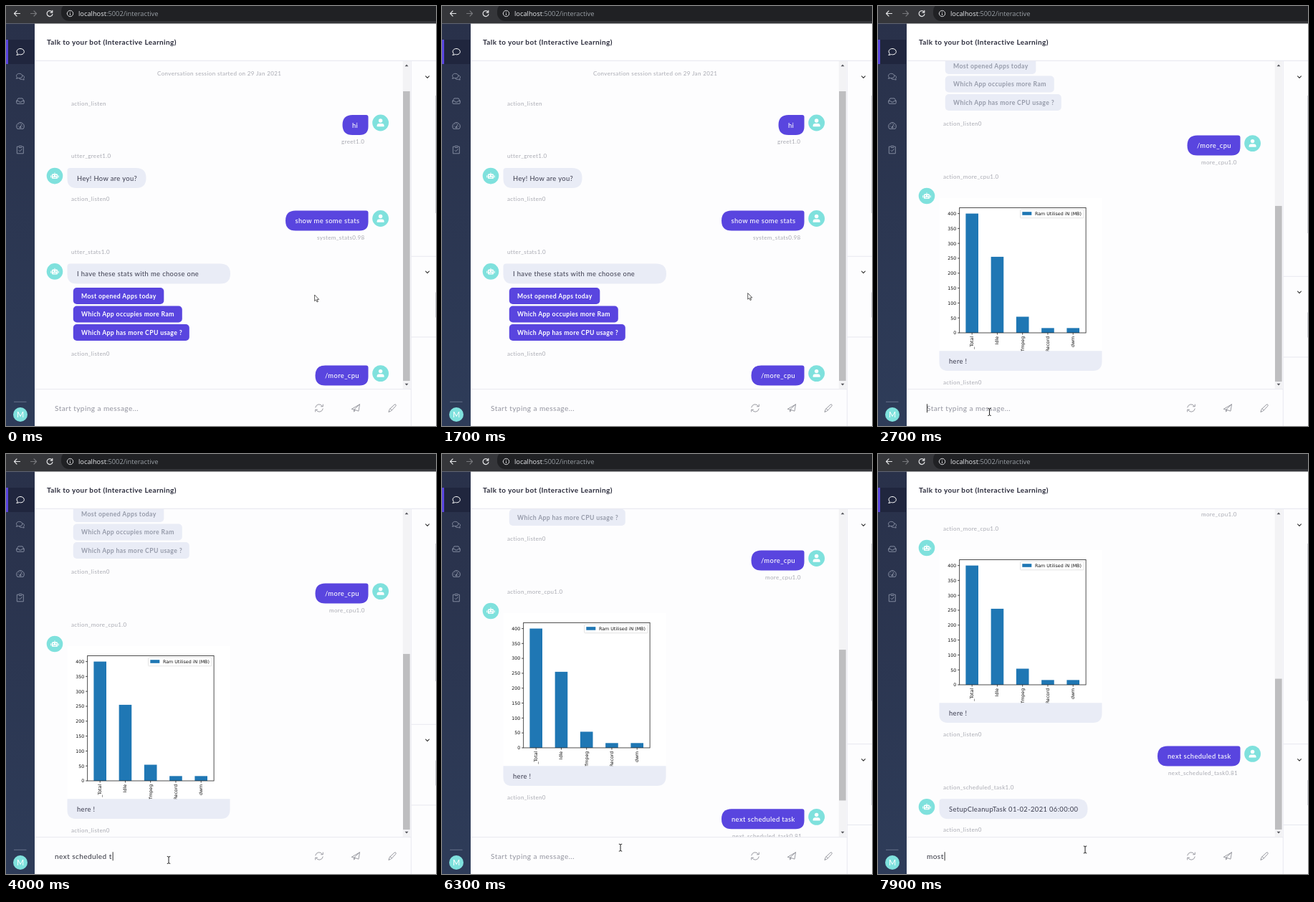
These frames come from a looping animation (600 px wide and 586 px high, 8 s). An HTML page:

```html
<!DOCTYPE html>
<html lang="en">
<head>
<meta charset="utf-8">
<title>Bot chat</title>
<style>
html, body { margin: 0; width: 100%; height: 100%; overflow: hidden; background: #fdfdfe; }
svg { display: block; }
text { font-family: Lato, sans-serif; white-space: pre; }
.url { font: 9.3px "Open Sans", sans-serif; fill: #e8eaed; }
.title { font-size: 10px; font-weight: 700; letter-spacing: .39px; fill: #2b2c3c; }
.label { font-size: 8px; letter-spacing: .37px; fill: #a9aab2; }
.msg { font-size: 9.4px; letter-spacing: .37px; fill: #3b3c4e; }
.mine { fill: #fff; font-weight: 500; }
.btn { font-size: 8.7px; font-weight: 700; letter-spacing: .35px; }
.input { font-size: 10.1px; letter-spacing: .41px; }
.plot { font: 6.3px "DejaVu Sans", sans-serif; fill: #111; }
.icon { fill: none; stroke-linecap: round; stroke-linejoin: round; }
</style>
</head>
<body>
<svg id="stage" width="600" height="586" viewBox="0 0 600 586"></svg>
<script>
const LOOP = 8000;
const PURPLE = '#5945df', TEAL = '#7fe1dd', PALE = '#e9ecf6', LINE = '#e5e6ee';
const stage = document.getElementById('stage');

function el(parent, tag, attrs = {}, text) {
  const node = document.createElementNS('http://www.w3.org/2000/svg', tag);
  for (const k in attrs) node.setAttribute(k, attrs[k]);
  if (text !== undefined) node.textContent = text;
  parent.appendChild(node);
  return node;
}
const group = (p, attrs) => el(p, 'g', attrs);
const rect = (p, x, y, width, height, fill, rx = 0) => el(p, 'rect', { x, y, width, height, fill, rx });
const disc = (p, cx, cy, r, fill) => el(p, 'circle', { cx, cy, r, fill });
const path = (p, d, attrs) => el(p, 'path', { d, ...attrs });
const text = (p, x, y, cls, s) => el(p, 'text', { x, y, class: cls }, s);
const icon = (p, x, y, d, stroke, width = .9) =>
  path(p, d, { class: 'icon', stroke, 'stroke-width': width, transform: `translate(${x} ${y})` });
const move = (node, x, y) => node.setAttribute('transform', `translate(${x} ${y})`);
const show = (node, on) => node.setAttribute('visibility', on ? 'visible' : 'hidden');

// Rounded box with corner radii: top left, top right, bottom right, bottom left
function box(p, x, y, w, h, fill, [a, b, c, d]) {
  path(p, `M${x + a} ${y}h${w - a - b}q${b} 0 ${b} ${b}v${h - b - c}q0 ${c} ${-c} ${c}` +
    `h${c + d - w}q${-d} 0 ${-d} ${-d}v${a + d - h}q0 ${-a} ${a} ${-a}z`, { fill });
}

// Chat parts
const label = (p, x, y, s) => text(p, x, y + 2.4, 'label', s);

function userMessage(p, x, y, tx, s) {
  box(p, x, y - 14, 505.5 - x, 28, PURPLE, [14, 3, 12, 14]);
  text(p, tx, y + 3.6, 'msg mine', s);
  disc(p, 522.6, y - 3, 11.4, TEAL);
  disc(p, 522.6, y - 6, 2.7, '#fff');
  path(p, `M517.6 ${y + 2.2}v-1.2q0-3 3-3h4q3 0 3 3v1.2z`, { fill: '#fff' });
}

function botAvatar(p, y) {
  disc(p, 68, y, 11.3, TEAL);
  rect(p, 63.9, y - 2.8, 8.2, 6.8, '#fff', 1.5);
  rect(p, 62.2, y - .8, 1.1, 3.2, '#fff', .4);
  rect(p, 72.7, y - .8, 1.1, 3.2, '#fff', .4);
  rect(p, 67.5, y - 4.6, 1, 2, '#fff');
  disc(p, 66.2, y - .3, .95, TEAL);
  disc(p, 69.8, y - .3, .95, TEAL);
  rect(p, 65.6, y + 2, 4.8, .8, TEAL);
}

function botMessage(p, y, w, s) {
  botAvatar(p, y - 3.2);
  box(p, 85.5, y - 14.2, w, 28, PALE, [4, 14, 14, 13]);
  text(p, 99, y + 3.5, 'msg', s);
}

function chart(p) {
  const base = 456, unit = 20.8 / 50;
  const bars = [['_Total', 400], ['Idle', 255], ['ffmpeg', 54], ['Record', 16], ['dwm', 16]];
  const ink = { fill: 'none', stroke: '#222', 'stroke-width': .8 };
  rect(p, 85.5, 268, 227, 214, '#fff');
  bars.forEach(([name, v], i) => {
    const x = 131.2 + i * 35.25;
    rect(p, x - 8.8, base - v * unit, 17.6, v * unit, '#1f77b4');
    path(p, `M${x} ${base}v2.6`, ink);
    el(p, 'text', { class: 'plot', 'text-anchor': 'end',
      transform: `translate(${x + 2} 460.8) rotate(-90)` }, name);
  });
  for (let v = 0; v <= 400; v += 50) {
    const y = base - v * unit;
    path(p, `M113.7 ${y}h-2.6`, ink);
    el(p, 'text', { x: 109.3, y: y + 2.3, class: 'plot', 'text-anchor': 'end' }, v);
  }
  el(p, 'rect', { x: 113.7, y: 281.4, width: 176.4, height: 174.6, ...ink });
  el(p, 'rect', { x: 198.5, y: 284, width: 88.5, height: 11.8, rx: 1.2,
    fill: '#fff', stroke: '#d0d0d0', 'stroke-width': .6 });
  rect(p, 201.3, 287.2, 13, 4.6, '#1f77b4');
  text(p, 219, 291.9, 'plot', 'Ram Utilised iN (MB)');
}

const defs = el(stage, 'defs');
const clip = el(defs, 'clipPath', { id: 'view' });
rect(clip, 40, 77, 525, 457.5, '#000');
const fade = el(defs, 'linearGradient', { id: 'side', x2: 0, y2: 1 });
el(fade, 'stop', { offset: 0, 'stop-color': '#29314a' });
el(fade, 'stop', { offset: 1, 'stop-color': '#2e3c59' });

rect(stage, 0, 0, 600, 586, '#fdfdfe');

// Conversation
const view = group(stage, { 'clip-path': 'url(#view)' });
const chat = group(view);
text(chat, 211, 96.6, 'label', 'Conversation session started on 29 Jan 2021');
label(chat, 91, 136.5, 'action_listen');
userMessage(chat, 469.5, 166, 483, 'hi');
label(chat, 468, 190, 'greet1.0');
label(chat, 91, 210, 'utter_greet1.0');
botMessage(chat, 240.3, 110, 'Hey! How are you?');
label(chat, 91, 270, 'action_listen0');
userMessage(chat, 390, 299.5, 403.5, 'show me some stats');
label(chat, 434, 323.8, 'system_stats0.98');
label(chat, 91, 344, 'utter_stats1.0');
botMessage(chat, 373.6, 227.5, 'I have these stats with me choose one');
const buttons = [['Most opened Apps today', 126.5], ['Which App occupies more Ram', 152],
  ['Which App has more CPU usage ?', 162]].map(([s, w], i) => {
  const y = 393 + i * 25.5;
  return [rect(chat, 93.8, y, w, 23, PURPLE, 5), text(chat, 105, y + 14.7, 'btn', s)];
});
label(chat, 91, 485.5, 'action_listen0');
userMessage(chat, 431.5, 515.6, 445, '/more_cpu');

const stats = group(chat);
label(stats, 451, 539.3, 'more_cpu1.0');
label(stats, 91, 559.5, 'action_more_cpu1.0');
botAvatar(stats, 586);
chart(group(stats, { transform: 'translate(0 321)' }));
box(stats, 85.5, 802.3, 227, 27.8, PALE, [0, 0, 13, 12]);
text(stats, 99, 820.3, 'msg', 'here !');
label(stats, 91, 846.3, 'action_listen0');

const asked = group(chat);
userMessage(asked, 390, 876.4, 404, 'next scheduled task');

const answer = group(chat);
label(answer, 405, 901, 'next_scheduled_task0.81');
label(answer, 91, 920.5, 'action_scheduled_task1.0');
botMessage(answer, 950.5, 207, 'SetupCleanupTask 01-02-2021 06:00:00');
label(answer, 91, 980, 'action_listen0');

// Scrollbar
rect(stage, 553.8, 77, 10.4, 457, '#f3f3f5');
const thumb = rect(stage, 554, 88, 9.6, 400, '#bebec0');
path(stage, 'M556.6 84.2h4.8l-2.4-2.8zM556.6 526.8h4.8l-2.4 2.8z', { fill: '#55565c' });

// Story panel
rect(stage, 564.8, 77, .9, 509, LINE);
const chevron = 'M-2.4-1.2 0 1.3 2.4-1.2';
icon(stage, 588, 99, chevron, '#333', 1.1);
const edge = rect(stage, 599, 125, 1, 164, '#d3d4db');
const panel = group(stage);
rect(panel, 565.5, 348.8, 35, .9, LINE);
icon(panel, 588, 371.4, chevron, '#333', 1.1);
rect(panel, 599, 399.5, 1, 35, '#d3d4db');
rect(panel, 565.5, 461.5, 35, .9, LINE);

// Header and browser bar
rect(stage, 40, 24, 560, 52, '#fff');
rect(stage, 40, 75.8, 560, 1, LINE);
text(stage, 57, 53.6, 'title', 'Talk to your bot (Interactive Learning)');
rect(stage, 0, 0, 600, 24.5, '#35363a');
rect(stage, 77, -4, 540, 25, '#202124', 11);
icon(stage, 15.5, 10.5, 'M4 0H-4M-.5-3.6-4 0-.5 3.6', '#e3e4e6', 1.2);
icon(stage, 38.5, 10.5, 'M-4 0H4M.5-3.6 4 0 .5 3.6', '#77787c', 1.2);
icon(stage, 61, 10.5, 'M3.2-2.2A3.9 3.9 0 1 0 3.9.8M3.8-4.2V-1.4H1', '#e3e4e6', 1.2);
icon(stage, 89.5, 10.5, 'M-4.2 0a4.2 4.2 0 1 0 8.4 0a4.2 4.2 0 1 0-8.4 0M0 0V2M0-2v.1', '#d5d6d9', 1);
const url = text(stage, 101, 14, 'url', 'localhost');
el(url, 'tspan', { fill: '#9aa0a6' }, ':5002/interactive');

// Sidebar
rect(stage, 0, 24.5, 40, 562, 'url(#side)');
rect(stage, 0, 47, 39, 34, '#20263e');
rect(stage, 0, 47, 3, 34, PURPLE);
const bubble = 'M-4.8 4.3Q-3.6 3-3.8 2.2C-6.6-.8-4-4.5 0-4.5C3.2-4.5 5.3-2.5 5.3-.3C5.3 3 1.5 4.5-1.6 3.5Q-3 4.4-4.8 4.3z';
icon(stage, 20, 64, bubble, '#fff', 1);
const dim = '#8d95a9';
icon(stage, 20, 98.5, 'M-5.3 2.5Q-4.4 1.6-4.6 1C-6.8-1.4-4.6-4.2-1.6-4.2C1.2-4.2 2.8-2.5 2.8-.9C2.8 1.6-.2 2.7-2.6 2Q-4 2.7-5.3 2.5zM3-1.8C6-1 6 1.5 4.6 2.8Q4.6 3.8 5.4 4.4Q3.6 4.6 2.6 3.8C1 4.3-.8 3.8-1.6 2.6', dim);
icon(stage, 20, 132.5, 'M-5.2 0-3-3.6H3L5.2 0V2.8Q5.2 3.8 4.2 3.8H-4.2Q-5.2 3.8-5.2 2.8zH-2.3L-1.4 1.5H1.4L2.3 0H5.2', dim);
icon(stage, 20, 167, 'M-4.4 4A5.3 5.3 0 1 1 4.4 4zM0 2 2-2M-1 2.2A1 1 0 1 0 1 2.2A1 1 0 1 0-1 2.2M-3.3.8h.1M-2.2-2h.1M3.3.8h.1M0-3h.1', dim);
icon(stage, 20, 200.5, 'M-4.3-4.3H-1.8V-5.2H1.8V-4.3H4.3V5.3H-4.3zM-2 1-.6 2.4 2.2-.8M-1.6-3H1.6', dim);
rect(stage, 11, 551.8, 17.5, 1, '#64708a');
disc(stage, 20, 570, 10, TEAL);
el(stage, 'text', { x: 20, y: 574, 'text-anchor': 'middle', fill: '#fff', 'font-size': 11 }, 'M');

// Message input
rect(stage, 40, 534.3, 525, .9, LINE);
const typed = text(stage, 68, 564.8, 'input', '');
const caret = rect(stage, 68, 555.3, .9, 12, '#222');
const grey = '#8f9098';
icon(stage, 437, 561, 'M-5.2-1A5.2 5.2 0 0 1 4.4-2.6M5.3-5V-2.2H2.5M5.2 1A5.2 5.2 0 0 1-4.4 2.6M-5.3 5V2.2H-2.5', grey);
icon(stage, 488, 561, 'M-5.5 1.2 5.5-5.2 4 4.2-.6 2.6zM5.5-5.2-2.4 2.1V5.2L-.6 2.6', grey);
icon(stage, 539, 561, 'M-4.8 5.2Q-4.6 2-2.8.6L3-4.8Q4.2-5.6 5-4.6Q5.6-3.8 4.8-2.8L-.6 3Q-2 4.8-4.8 5.2zM-2.8.6-.6 3', grey);

// Pointers
const arrow = path(stage, 'M0 0V8.6L2 6.9 3.4 10 4.8 9.4 3.5 6.4H6.1z',
  { fill: '#fff', stroke: '#333', 'stroke-width': .8 });
const beam = icon(stage, 0, 0, 'M-1.8-5Q0-5 0-4V4Q0 5-1.8 5M1.8-5Q0-5 0-4M0 4Q0 5 1.8 5', '#222', 1);

const ARRIVE = 1885, SEND = 4450, REPLY = 6200;
const MOUSE = [[0, 430.6, 403], [1650, 430.6, 403], [2000, 362.8, 361.2], [2550, 155.5, 566.5],
  [3000, 155.5, 566.5], [3500, 227, 566.5], [6200, 227, 566.5], [6600, 365.5, 457.8],
  [7200, 365.5, 457.8], [7700, 289, 552], [LOOP, 289, 552]];
const clamp = v => Math.max(0, Math.min(1, v));
const ease = p => p < .5 ? 4 * p ** 3 : 1 - 4 * (1 - p) ** 3;
const glide = (t, start, span) => ease(clamp((t - start) / span));

function mouseAt(t) {
  const i = MOUSE.findIndex(k => k[0] > t);
  const [t0, x0, y0] = MOUSE[i - 1], [t1, x1, y1] = MOUSE[i];
  const p = (t - t0) / (t1 - t0), s = p * p * (3 - 2 * p);
  return [x0 + (x1 - x0) * s, y0 + (y1 - y0) * s];
}

function draft(t) {
  if (t < SEND) return 'next scheduled task'.slice(0, Math.max(0, Math.ceil((t - 2780) / 80)));
  return 'most'.slice(0, Math.max(0, Math.ceil((t - 7500) / 95)));
}

function render(t) {
  const done = t >= ARRIVE, replied = t >= REPLY;
  const scroll = 321 * glide(t, ARRIVE, 600) + 40 * glide(t, SEND, 350) + 94 * glide(t, REPLY, 400);
  move(chat, 0, -scroll);
  show(stats, done);
  show(asked, t >= SEND);
  show(answer, replied);
  for (const [back, word] of buttons) {
    back.setAttribute('fill', done ? PALE : PURPLE);
    word.setAttribute('fill', done ? '#979cab' : '#fff');
  }

  const height = replied ? 945 : t >= SEND ? 851 : done ? 811 : 492;
  thumb.setAttribute('y', 88 + (scroll + 35) * 435 / height);
  thumb.setAttribute('height', 457 * 435 / height);

  const grow = replied ? 55.5 : done ? 28 : 0;
  move(panel, 0, grow);
  edge.setAttribute('height', 164 + grow);

  const words = draft(t);
  typed.textContent = words || 'Start typing a message...';
  typed.setAttribute('fill', words ? '#33343f' : '#93949f');
  caret.setAttribute('x', words ? 69 + typed.getComputedTextLength() : 68);
  const focus = t >= 2550 && t < REPLY || t >= 7300;
  show(caret, focus && (words || t < 2800 || t % 1000 >= 500));

  const [x, y] = mouseAt(t), inInput = y > 535;
  move(arrow, x, y);
  move(beam, x, y);
  show(arrow, !inInput);
  show(beam, inInput);
}

function tick() {
  render(performance.now() % LOOP);
  requestAnimationFrame(tick);
}
tick();
</script>
</body>
</html>
```
